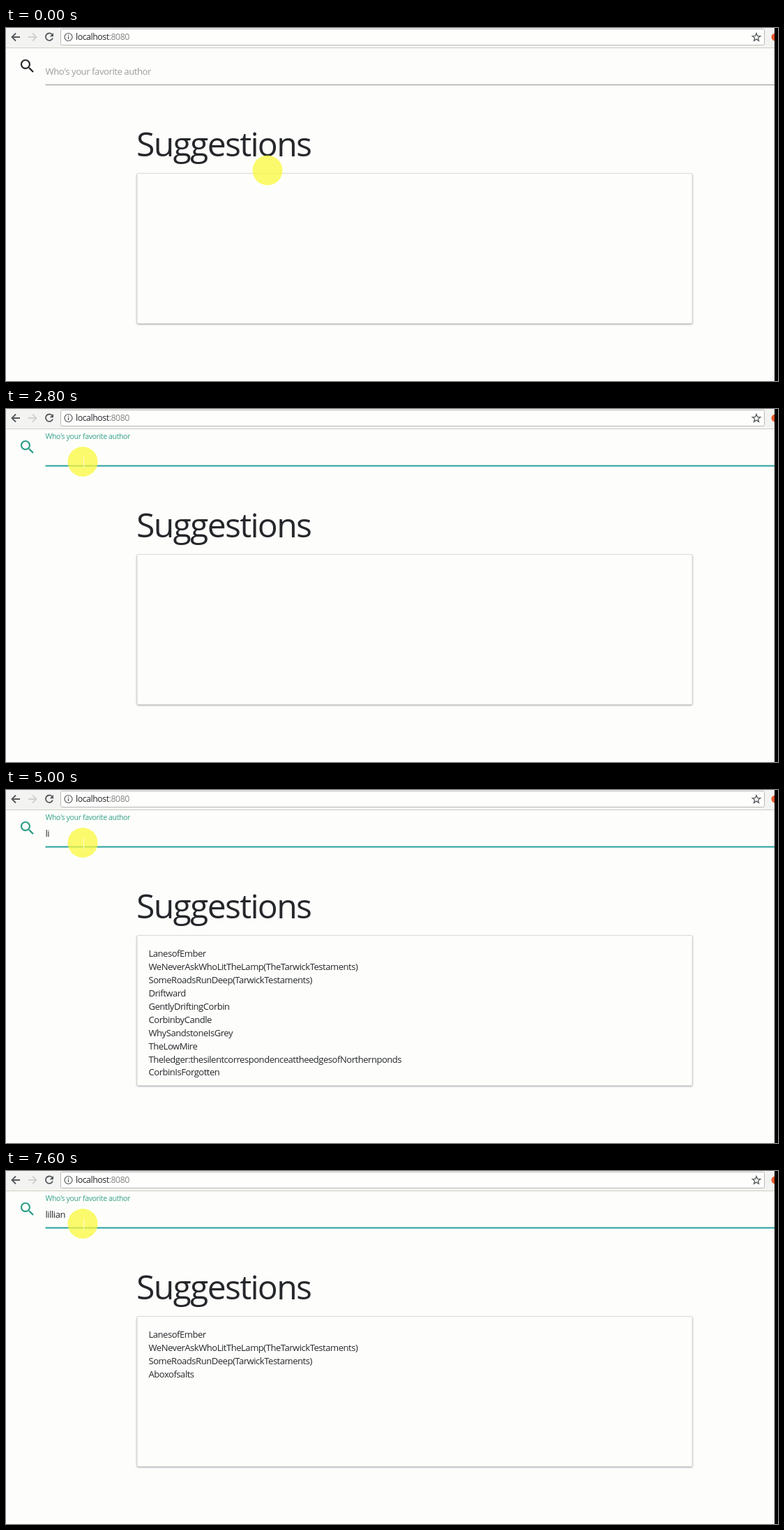
These frames come from a looping animation (1107 by 506 pixels, 8000 ms). An HTML page:

```html
<!DOCTYPE html>
<html lang="en">
<head>
<meta charset="utf-8">
<title>Author search</title>
<style>
html, body { margin: 0; width: 100%; height: 100%; overflow: hidden; background: #fdfefb; }
svg { display: block; width: 1107px; height: 506px; }
text { font-family: "Open Sans", "Noto Sans", sans-serif; font-size: 13px; letter-spacing: -.035em; fill: #25272b; }
.card { fill: #fdfefb; stroke: #dcded4; filter: drop-shadow(0 1px .8px #7c8094b0); }
.icon { fill: none; stroke: #55585a; stroke-width: 1.8; }
</style>
</head>
<body>
<svg viewBox="0 0 1107 506">
  <rect width="1107" height="506" fill="#fdfefb"/>

  <!-- browser bar -->
  <rect width="1107" height="28" fill="#f3f4f2"/>
  <path d="M0 28.5H1107" stroke="#cfcfc2"/>
  <rect x="78.5" y="1.5" width="1009" height="23" rx="2" fill="#fefefd" stroke="#b9bab8"/>
  <path class="icon" d="M20 13H9M14 7.5L8.500 13L14 18.500"/>
  <path class="icon" d="M32 13H43M38 7.500L43.500 13L38 18.500" style="stroke:#d0d1cf"/>
  <path class="icon" d="M66 9.200A5.200 5.200 0 1 0 67 14.500"/>
  <path d="M68 7V12.300H62.700Z" fill="#55585a"/>
  <circle class="icon" cx="89.500" cy="13" r="5.500" style="stroke-width:1.200"/>
  <path class="icon" d="M89.500 12V16M89.500 9.500V11" style="stroke-width:1.300"/>
  <text x="100" y="17" style="font-size:12.300px">localhost<tspan fill="#808280">:8080</tspan></text>
  <path class="icon" id="star" style="stroke-width:1.300"/>
  <circle cx="1103" cy="13" r="5.500" fill="#ea5a2c"/>

  <!-- search field -->
  <path id="lens" transform="translate(17.700 41.700) scale(1.080)" d="M15.5 14h-.79l-.28-.27C15.41 12.590 16 11.110 16 9.500 16 5.910 13.090 3 9.500 3S3 5.910 3 9.500 5.910 16 9.500 16c1.610 0 3.090-.59 4.230-1.570l.27.28v.79l5 4.990L20.490 19l-4.990-5zm-6 0C7.010 14 5 11.990 5 9.500S7.010 5 9.500 5 14 7.010 14 9.500 11.990 14 9.500 14z"/>
  <text id="label" x="56.500">Who's your favorite author</text>
  <text id="query" x="56.500" y="67"></text>
  <path id="caret" stroke="#222"/>
  <path id="line"/>

  <text x="187" y="184" style="font-size:48px">Suggestions</text>
  <rect class="card" x="188" y="208.500" width="796" height="215" rx="1.500"/>
  <g id="list"></g>

  <!-- pointer highlight -->
  <g id="pointer">
    <circle r="21.500" fill="#fbf83c" opacity=".75"/>
    <path id="beam" d="M1.500 -7V9" stroke="#fffbd0"/>
  </g>
  <rect x="1102" width="5" height="506"/>
</svg>
<script>
const $ = id => document.getElementById(id);
const set = (id, attrs) => {
  for (const key in attrs) $(id).setAttribute(key, attrs[key]);
};

const titles = [
  "LanesofEmber",
  "WeNeverAskWhoLitTheLamp(TheTarwickTestaments)",
  "SomeRoadsRunDeep(TarwickTestaments)",
  "TheClockMenders",
  "Driftward",
  "AnUncle'sLantern",
  "NinthWhisper",
  "BorrowedTides",
  "ACabAfterSunset:SlowLantern\\ParkedUnderMoonbeam\\TollsForATune",
  "ReluctantGuests",
  "GentlyDriftingCorbin",
  "CorbinbyCandle",
  "WhySandstoneIsGrey",
  "TheLowMire",
  "Theledger:thesilentcorrespondenceattheedgesofNorthernponds",
  "CorbinIsForgotten",
  "Aboxofsalts",
  "CorbinintheSnow"
];

const results = [
  [],
  [0, 1, 2, 3, 4, 5, 6, 7, 8, 9],
  [0, 1, 2, 4, 10, 11, 12, 13, 14, 15],
  [0, 1, 2, 10, 11, 13, 14, 15, 16, 17],
  [0, 1, 2, 16]
];

// start time, typed text, caret visible, result set
const states = [
  [0, "", 0, 0], [2200, "", 1, 0], [2800, "", 0, 0], [3200, "", 1, 0],
  [3600, "", 0, 0], [3800, "l", 1, 0], [4200, "l", 1, 1], [4400, "l", 0, 1],
  [4800, "li", 1, 1], [5000, "li", 0, 2], [5400, "lil", 1, 2],
  [5600, "lill", 1, 3], [6000, "lill", 0, 3], [6600, "lill", 1, 3],
  [6800, "lilli", 1, 3], [7000, "lillia", 1, 3], [7200, "lillian", 1, 3],
  [7400, "lillian", 1, 4], [7600, "lillian", 0, 4]
];

const star = Array.from({ length: 10 }, (_, i) => {
  const a = i * Math.PI / 5, r = i % 2 ? 2.6 : 6;
  return `${1076 + r * Math.sin(a)} ${13.5 - r * Math.cos(a)}`;
});
set("star", { d: `M${star.join("L")}Z` });

const rows = results[1].map((_, i) => {
  const row = document.createElementNS("http://www.w3.org/2000/svg", "text");
  row.setAttribute("x", 204.5);
  row.setAttribute("y", 239.3 + 18.9 * i);
  return $("list").appendChild(row);
});

function drawPointer(t) {
  const p = Math.min(t / 1200, 1), e = p * p * (3 - 2 * p);
  const y = t < 1600 ? 204 - 136 * e : 75.5;
  set("pointer", { transform: `translate(${375 - 265 * e} ${y})` });
  set("beam", { opacity: t < 1200 ? 0 : 1 });
}

function drawField(t) {
  const focus = t >= 2000;
  const lift = t < 2000 ? 0 : t < 2200 ? 0.5 : 1;
  set("lens", { fill: focus ? "#2c9c88" : "#25272b" });
  set("label", {
    y: 67 - 24 * lift,
    style: `font-size:${13.15 - 2.6 * lift}px;fill:${focus ? "#35a08a" : "#9c9e99"}`
  });
  set("line", {
    d: focus ? "M56.500 81.500H1102" : "M56.500 81.500H1102",
    stroke: focus ? "#26a0a0" : "#8f9290",
    "stroke-width": focus ? 2 : 1
  });
}

function drawResults(t) {
  const [, text, caret, set_] = states.findLast(s => s[0] <= t);
  $("query").textContent = text;
  const x = Math.round(56.5 + $("query").getComputedTextLength()) + 0.5;
  set("caret", { d: `M${x} 54V71`, opacity: caret });
  rows.forEach((row, i) => row.textContent = titles[results[set_][i]] ?? "");
}

function frame() {
  const t = Math.floor(performance.now() % 8000 / 200) * 200;
  drawPointer(t);
  drawField(t);
  drawResults(t);
  requestAnimationFrame(frame);
}
frame();
</script>
</body>
</html>
```
